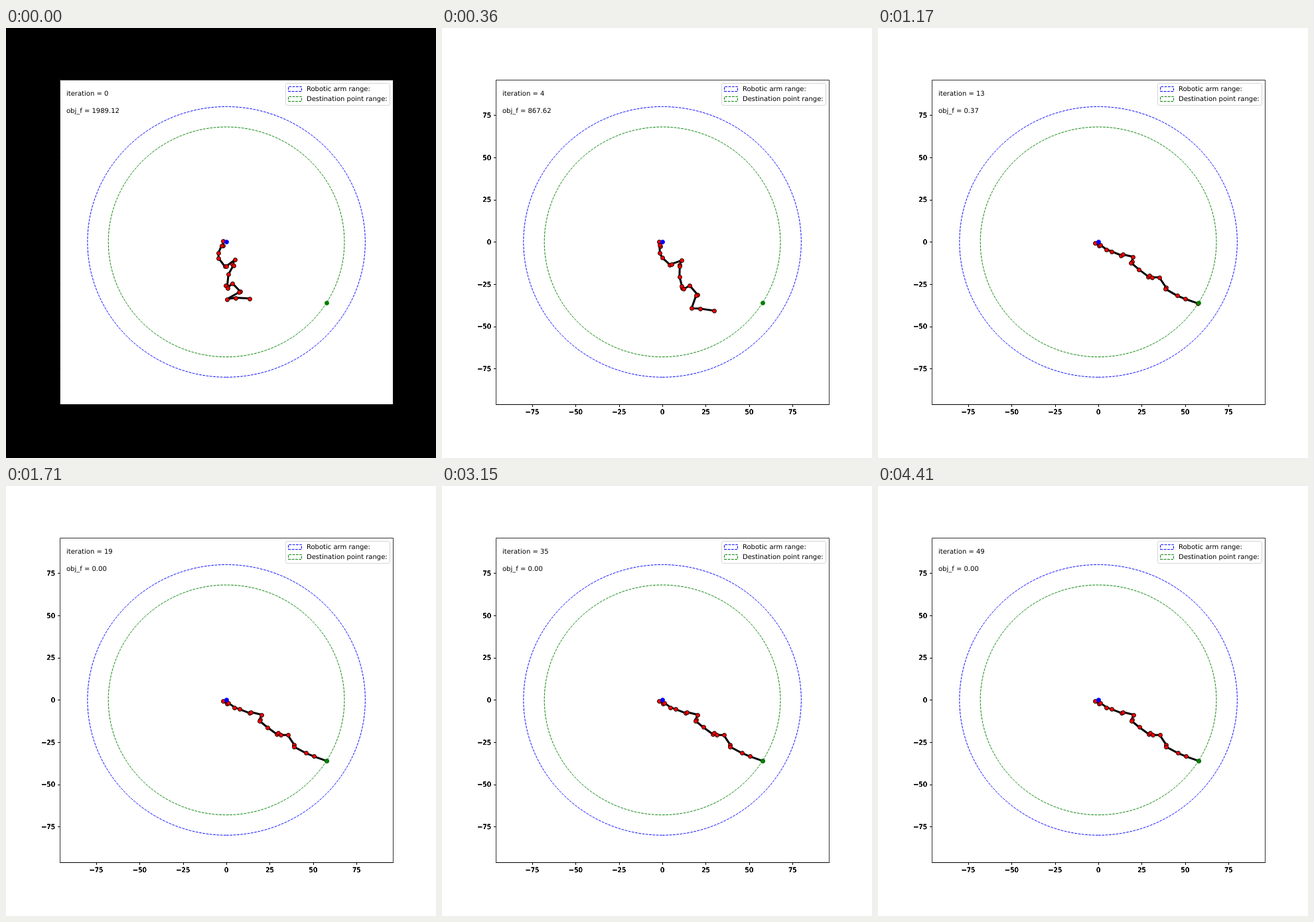
These frames come from a looping animation (648 px wide and 648 px high, 4.5 s). An HTML page with a canvas:

```html
<!DOCTYPE html>
<html lang="en">
<head>
<meta charset="utf-8">
<title>Robotic arm reaching a point</title>
<style>
html, body { margin: 0; width: 100%; height: 100%; overflow: hidden; background: #fff; }
canvas { display: block; width: 648px; height: 648px; }
</style>
</head>
<body>
<canvas id="stage" width="648" height="648"></canvas>
<script>
const c = document.getElementById('stage').getContext('2d');
const STEP = 90, COUNT = 50, LIMIT = 96;
const LEFT = 81, TOP = 77.76, WIDTH = 502.2, HEIGHT = 489.24;
const SX = WIDTH / LIMIT / 2, SY = HEIGHT / LIMIT / 2;
const px = v => LEFT + WIDTH / 2 + v * SX;
const py = v => TOP + HEIGHT / 2 - v * SY;
const snap = v => Math.round(v) + 0.5;
const BLUE = '#00f', GREEN = '#008000';

// Each link: length in pixels, first and last heading in degrees (clockwise)
const LINKS = [
  [5, 191, 158], [7, 90, 36], [2.4, 185, 316], [12, 113, 37], [8, 89, 20],
  [16, 54, 22], [2.7, -12, -31], [16, -37, 14], [7.4, 119, 104], [2.5, 64, 116],
  [15.6, 118, 40], [18, 96, 37], [2.5, 202, 319], [5, 58, 34], [10.5, -45, 1],
  [18, 47, 57], [2.8, 158, 105], [20.6, 150, 29], [13, -9, 23], [21, 3, 20]
];

// Objective (squared distance left) falls from its first value to zero
const START = 1989.12;
const objective = n => START * Math.exp(-3.462 * (Math.max(n - 1, 0) / 7) ** 1.686);

function text(s, x, y, align = 'left', times = 1) {
  c.fillStyle = '#000';
  c.font = '10px "DejaVu Sans", sans-serif';
  c.textRendering = 'geometricPrecision';
  c.textAlign = align;
  while (times--) c.fillText(s, x, y);
}

function line(x1, y1, x2, y2) {
  c.beginPath();
  c.moveTo(x1, y1);
  c.lineTo(x2, y2);
  c.stroke();
}

function dot(x, y, fill, edge = fill) {
  c.beginPath();
  c.arc(snap(x), snap(y), 3, 0, 7);
  c.fillStyle = fill;
  c.strokeStyle = edge;
  c.lineWidth = 1;
  c.fill();
  c.stroke();
}

function dashed(color, trace) {
  c.strokeStyle = color;
  c.lineWidth = 1;
  c.setLineDash([3.7, 1.6]);
  c.beginPath();
  trace();
  c.stroke();
  c.setLineDash([]);
}

function range(r, color) {
  dashed(color, () =>
    c.ellipse(px(0), py(0), r * SX, r * SY, 0, Math.PI / 2, -1.5 * Math.PI, true));
}

function axes() {
  c.fillStyle = '#fff';
  c.strokeStyle = '#000';
  c.lineWidth = 0.8;
  c.fillRect(81, 78, 502, 489);
  c.strokeRect(81.5, 78.5, 502, 489);
  c.lineWidth = 1;
  line(81, 567.5, 584, 567.5);
  for (let v = -75; v <= 75; v += 25) {
    const label = String(v).replace('-', '\u2212');
    line(snap(px(v)), 567, snap(px(v)), 571);
    line(78, snap(py(v)), 82, snap(py(v)));
    text(label, px(v), 582, 'center', 4);
    text(label, 74, Math.round(py(v) + 3.7), 'right', 4);
  }
}

function legendRow(label, y, color) {
  dashed(color, () => {
    c.moveTo(425.5, y);
    c.lineTo(445.5, y);
    c.lineTo(445.5, y - 7);
    c.lineTo(425.5, y - 7);
    c.closePath();
  });
  text(label, 453, y - 0.5);
}

function legend() {
  c.beginPath();
  c.roundRect(421.5, 83.5, 157, 33, 2);
  c.fillStyle = 'rgba(255,255,255,.8)';
  c.strokeStyle = 'rgba(204,204,204,.8)';
  c.lineWidth = 1;
  c.fill();
  c.stroke();
  legendRow('Robotic arm range:', 95.5, BLUE);
  legendRow('Destination point range:', 110.5, GREEN);
}

function arm(progress) {
  let x = px(0), y = py(0);
  const joints = LINKS.map(([length, from, to]) => {
    const a = (from + (to - from) * progress) * Math.PI / 180;
    x += length * Math.cos(a);
    y += length * Math.sin(a) * SY / SX;
    return [x, y];
  });
  c.strokeStyle = '#000';
  c.lineWidth = 3;
  c.lineJoin = 'round';
  c.beginPath();
  c.moveTo(px(0), py(0));
  joints.forEach(p => c.lineTo(...p));
  c.stroke();
  joints.forEach(p => dot(...p, '#f00', '#000'));
}

function draw(n) {
  c.fillStyle = n ? '#fff' : '#000';
  c.fillRect(0, 0, 648, 648);
  axes();
  range(80, BLUE);
  range(68, GREEN);
  const left = objective(n);
  arm(1 - Math.sqrt(left / START));
  dot(px(0), py(0), BLUE);
  dot(483, 414, GREEN);
  text('iteration = ' + n, 91, 102);
  text('obj_f = ' + left.toFixed(2), 91, 128);
  legend();
}

function tick() {
  draw(Math.floor(performance.now() / STEP) % COUNT);
  requestAnimationFrame(tick);
}
tick();
</script>
</body>
</html>
```
